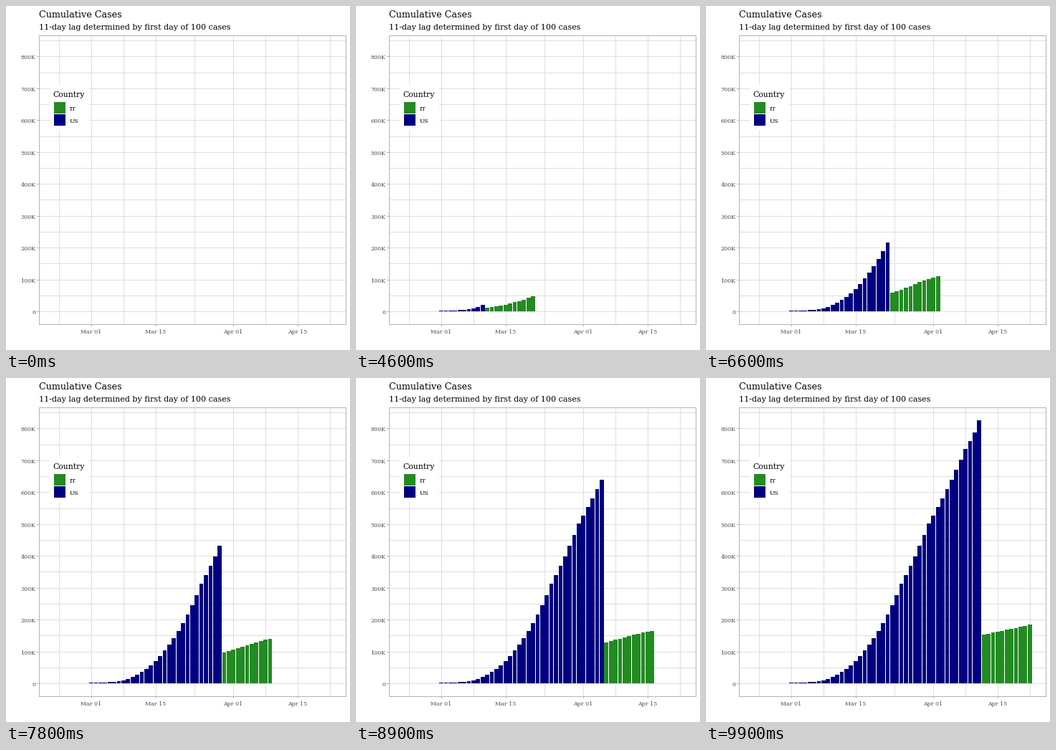
These frames come from a looping animation (480 by 480 pixels, 10 s). A matplotlib script:

```python
import numpy as np
import matplotlib.pyplot as plt
from matplotlib.animation import FuncAnimation
from matplotlib.collections import PolyCollection
from matplotlib.patches import Rectangle

SIZE, DPI = 480, 80
FRAMES, INTERVAL = 100, 100

DAYS, LAG = 60, 11           # days shown, shift of the US series
MAR1, MAR1_X, DAY_W = 8, 119.65, 6.394
ZERO_Y, CASE_H = 426.58, 0.00044465
LEFT, RIGHT, TOP, BOTTOM = 46, 474, 41, 444

GRID, EDGE, LABEL = "#DEDEDE", "#B3B3B3", "#4D4D4D"
GREEN, NAVY = "#228B22", "#000080"


def growth(points):
    """Daily totals, interpolated between key days on a fourth-root scale."""
    days, cases = zip(*points.items())
    root = np.interp(np.arange(days[-1] + 1), days, np.power(cases, 0.25))
    return root ** 4


# Thousands of cases, keyed by days after the Mar 01 position
ITALY = 1000 * growth({0: 1.13, 1: 1.69, 4: 3.09, 9: 9.17, 15: 24.7, 21: 53.6,
                       28: 92.5, 31: 105.8, 36: 128.9, 43: 156.4, 52: 184})
USA = 1000 * growth({0: 1.31, 5: 4.66, 8: 14.2, 11: 35.2, 16: 104.7, 20: 189.6,
                     24: 312.2, 30: 501.6, 34: 609.5, 38: 735.1, 40: 787.8,
                     41: 825})

KEY_FRAMES = np.rint(np.arange(DAYS + 1) * (FRAMES - 1) / DAYS)

plt.rcParams["font.family"] = "DejaVu Serif"
fig = plt.figure(figsize=(SIZE / DPI, SIZE / DPI), dpi=DPI, facecolor="white")
ax = fig.add_axes([0, 0, 1, 1])
ax.set(xlim=(0, SIZE), ylim=(SIZE, 0))
ax.axis("off")


def day_x(day):
    return MAR1_X + (day - MAR1) * DAY_W


def case_y(cases):
    return ZERO_Y - cases * CASE_H


def box(x0, y0, x1, y1, color, z):
    ax.add_patch(Rectangle((x0, y0), x1 - x0, y1 - y0, facecolor=color,
                           linewidth=0, antialiased=False, zorder=z))


def text(x, y, s, px, color="black", ha="left"):
    ax.text(x, y, s, fontsize=px * 72 / DPI, color=color, ha=ha,
            va="baseline", zorder=6)


def draw_panel():
    for cases in range(0, 850001, 50000):
        y = int(case_y(cases))
        box(LEFT, y, RIGHT, y + 1, GRID, 1)
        if cases % 100000 == 0:
            box(LEFT - 3, y, LEFT, y + 1, EDGE, 3)
            label = f"{cases // 1000}K" if cases else "0"
            text(41.5, y + 4, label, 8, LABEL, "right")

    major = {8: "Mar 01", 22: "Mar 15", 39: "Apr 01", 53: "Apr 15"}
    for day in (1, 8, 15, 22, 30.5, 39, 46, 53, 60):
        x = int(day_x(day))
        box(x, TOP, x + 1, BOTTOM, GRID, 1)
        if day in major:
            box(x, BOTTOM + 1, x + 1, BOTTOM + 3, EDGE, 3)
            text(x, 457, major[day], 7.9, LABEL, "center")

    for x in (LEFT, RIGHT):
        box(x, TOP, x + 1, BOTTOM + 1, EDGE, 3)
    for y in (TOP, BOTTOM):
        box(LEFT, y, RIGHT + 1, y + 1, EDGE, 3)


def draw_legend():
    box(61, 110, 116, 173, "white", 4)
    text(65.5, 127, "Country", 10.9)
    for i, (name, color) in enumerate((("IT", GREEN), ("US", NAVY))):
        y = 134 + 17 * i
        box(67, y, 83, y + 16, color, 5)
        text(89, y + 12, name, 8.2)


def bar(day, cases):
    x0, x1 = (int(day_x(day + side)) for side in (-0.45, 0.45))
    y0, y1 = int(case_y(cases)), int(ZERO_Y)
    return [(x0, y0), (x1, y0), (x1, y1), (x0, y1)]


def series(values, head):
    """All bars up to the head, plus the head bar sliding between two days."""
    days = MAR1 + np.arange(len(values))
    if head < MAR1:
        return []
    shown = [(d, v) for d, v in zip(days, values) if d <= head]
    shown.append((head, np.interp(head, days, values)))
    return [bar(d, v) for d, v in shown if int(case_y(v)) < int(ZERO_Y)]


def add_bars(color, z):
    bars = PolyCollection([], facecolors=color, edgecolors="none",
                          linewidths=0, antialiaseds=False, zorder=z)
    ax.add_collection(bars, autolim=False)
    return bars


text(46, 16.3, "Cumulative Cases", 12.8)
text(46, 33.3, "11-day lag determined by first day of 100 cases", 11.1)
draw_panel()
draw_legend()
italy, usa = add_bars(GREEN, 2), add_bars(NAVY, 2.5)


def update(frame):
    head = np.interp(frame, KEY_FRAMES, np.arange(DAYS + 1))
    italy.set_verts(series(ITALY, head))
    usa.set_verts(series(USA, head - LAG))
    return italy, usa


anim = FuncAnimation(fig, update, frames=FRAMES, interval=INTERVAL,
                     init_func=lambda: update(0), repeat=True, repeat_delay=0)
plt.show()
```
